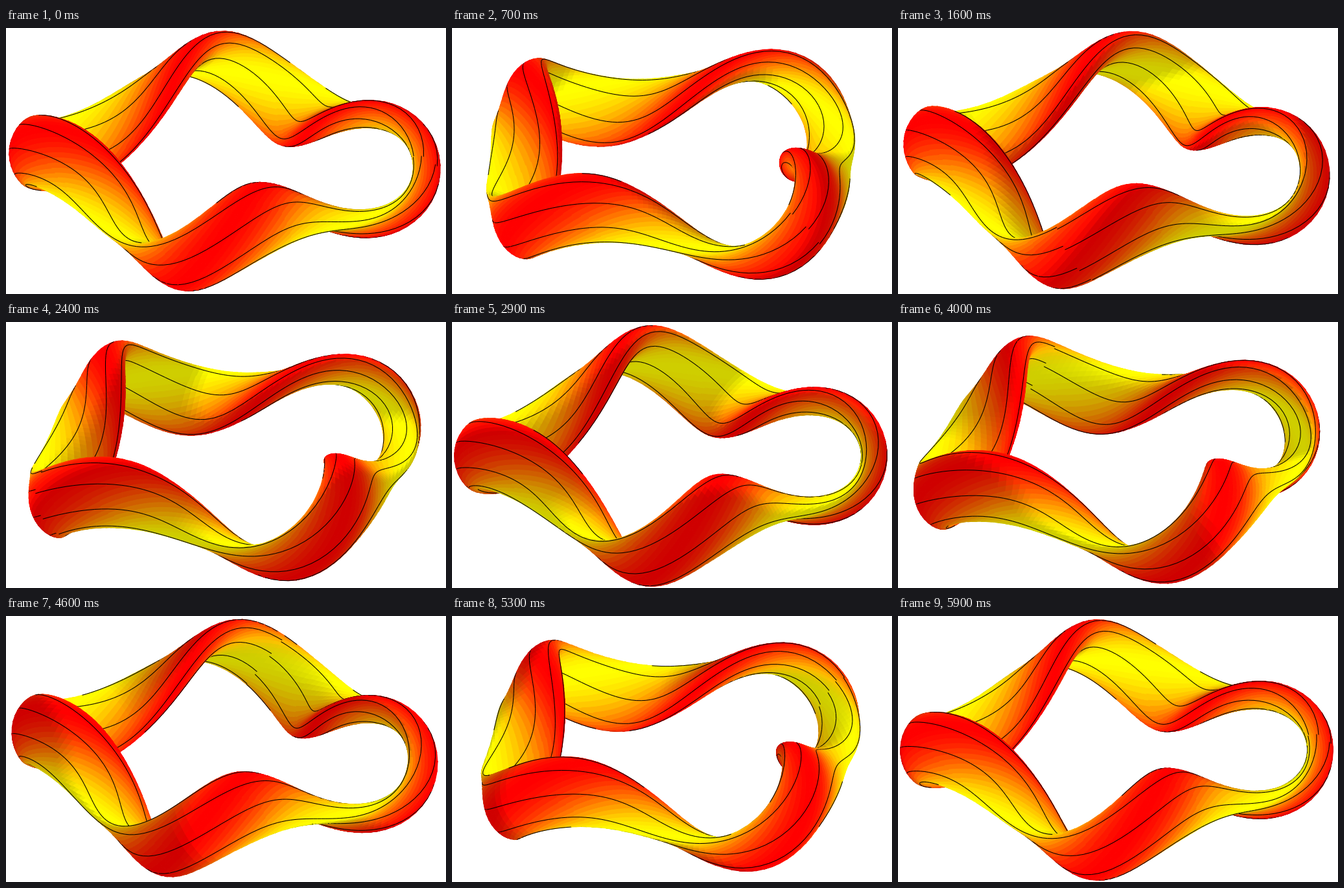
Animation of 679x411 px, one loop 6 s. Source, as a matplotlib script:

```python
import numpy as np
import matplotlib.pyplot as plt
from matplotlib.animation import FuncAnimation
from matplotlib.collections import PolyCollection

W, H, DPI = 679, 411, 100
CX, CY, SCALE = 337.5, 207, 264
ELEV = np.radians(28)
FRAMES = 60
N_PHI, N_THETA, N_LINES = 201, 36, 8
MINOR, ETA, INWARD = 0.124, 1.569, 0.045
AXIS_R = [1, 0.17, 0.01804, 0.001409, 5.877e-05]
AXIS_Z = [0, 0.1581, 0.0182, 0.001548, 7.772e-05]


def unit(v):
    return v / np.linalg.norm(v, axis=-1, keepdims=True)


def dot(a, b):
    return (a * b).sum(-1)


# Closed helical axis with four field periods, and its Frenet frame
phi = np.arange(N_PHI) * 2 * np.pi / N_PHI
radius = sum(c * np.cos(4 * k * phi) for k, c in enumerate(AXIS_R))
height = sum(c * np.sin(4 * k * phi) for k, c in enumerate(AXIS_Z))
radial = np.stack([np.cos(phi), np.sin(phi), 0 * phi], axis=-1)
axis = radius[:, None] * radial
axis[:, 2] = height

wave = 1j * np.fft.fftfreq(N_PHI, 1 / N_PHI)
deriv = np.fft.ifft(wave[:, None] * np.fft.fft(np.eye(N_PHI), axis=0), axis=0).real
velocity = deriv @ axis
speed = np.linalg.norm(velocity, axis=1)
tangent = velocity / speed[:, None]
bend = deriv @ tangent / speed[:, None]
kappa = np.linalg.norm(bend, axis=1)
normal = bend / kappa[:, None]
binormal = np.cross(tangent, normal)
torsion = -dot(deriv @ binormal, normal) / speed
mean_speed = speed.mean()


def solve_twist():
    """Newton solution for the ellipse tilt sigma and the field line twist."""
    stretch = (ETA / kappa) ** 2
    d_arc = deriv * (mean_speed / speed)[:, None]
    drive = 2 * stretch * torsion * mean_speed
    sigma = np.zeros(N_PHI)
    twist = -drive.mean() / (stretch ** 2 + 1).mean()
    for _ in range(12):
        weight = stretch ** 2 + 1 + sigma ** 2
        residual = d_arc @ sigma + twist * weight + drive
        jac = d_arc + np.diag(2 * twist * sigma)
        jac[:, 0] = weight
        step = np.linalg.solve(jac, -residual)
        twist += step[0]
        sigma[1:] += step[1:]
    return sigma, twist


def wrap(a):
    return np.concatenate([a, a[:1]])


sigma, twist = solve_twist()
axis, normal, binormal, radial = map(wrap, (axis, normal, binormal, radial))
kappa, sigma, speed = map(wrap, (kappa, sigma, speed))
arc = np.concatenate([[0], np.cumsum((speed[1:] + speed[:-1]) / 2)])
arc *= 2 * np.pi / arc[-1]


def surface(theta):
    """Points of the tube for angles theta of shape (N_PHI + 1, m)."""
    c, s = np.cos(theta), np.sin(theta)
    thin = (ETA / kappa)[:, None]
    x = MINOR * thin * c
    y = MINOR / thin * (s + sigma[:, None] * c)
    shift = INWARD * s ** 2
    return (axis[:, None] + x[..., None] * normal[:, None]
            + y[..., None] * binormal[:, None] - shift[..., None] * radial[:, None])


# Surface patches
theta = np.linspace(0, 2 * np.pi, N_THETA + 1)
grid = surface(np.tile(theta, (N_PHI + 1, 1)))
p00, p10 = grid[:-1, :-1], grid[1:, :-1]
p01, p11 = grid[:-1, 1:], grid[1:, 1:]
quads = np.stack([p00, p10, p11, p01], axis=2).reshape(-1, 4, 3)
quad_normals = unit(np.cross(p01 - p10, p11 - p00)).reshape(-1, 3)

light = np.array([0, -np.cos(ELEV), np.sin(ELEV)])
shade = np.clip(0.81 + 0.7 * np.maximum(quad_normals @ light, 0), 0, 1)
field = np.tile((1 + np.cos((theta[:-1] + theta[1:]) / 2)) / 2, N_PHI)
quad_colors = np.stack([shade, shade * field, 0 * shade], axis=1)

# Field lines as short flat pieces
start = (np.arange(N_LINES) + 0.5) * 2 * np.pi / N_LINES
angle = start + twist * arc[:, None]
line = surface(angle)
around = surface(angle + 0.01) - surface(angle - 0.01)
a, b = line[:-1], line[1:]
pieces = np.stack([a, b, b, a], axis=2).reshape(-1, 4, 3)
piece_normals = unit(np.cross(around[:-1] + around[1:], b - a)).reshape(-1, 3)

shapes = np.concatenate([quads, pieces])
normals = np.concatenate([quad_normals, piece_normals])
colors = np.concatenate([quad_colors, np.zeros((len(pieces), 3))])
centers = shapes.mean(axis=1)
is_line = np.arange(len(shapes)) >= len(quads)
bias = np.where(is_line, 0.05, 0)
horizon = np.where(is_line, -0.1, 0)

fig = plt.figure(figsize=(W / DPI, H / DPI), dpi=DPI, facecolor="white")
ax = fig.add_axes([0, 0, 1, 1])
ax.set(xlim=(0, W), ylim=(H, 0))
ax.axis("off")
tube = PolyCollection([], linewidths=0.75, joinstyle="round")
ax.add_collection(tube, autolim=False)


def update(frame):
    turn = 2 * np.pi * (frame + 1) / FRAMES
    c, s = np.cos(turn), np.sin(turn)
    ce, se = np.cos(ELEV), np.sin(ELEV)
    right = np.array([c, s, 0])
    up = np.array([-se * s, se * c, ce])
    toward = np.array([ce * s, -ce * c, se])

    seen = np.flatnonzero(normals @ toward > horizon)
    depth = centers[seen] @ toward + bias[seen]
    order = seen[np.argsort(depth)]
    flat = shapes[order] @ np.stack([right, -up], axis=1)
    tube.set_verts(flat * SCALE + [CX, CY])
    tube.set_facecolor(colors[order])
    tube.set_edgecolor(colors[order])
    return [tube]


anim = FuncAnimation(fig, update, frames=FRAMES, interval=100,
                     repeat=True, repeat_delay=0)
plt.show()
```
